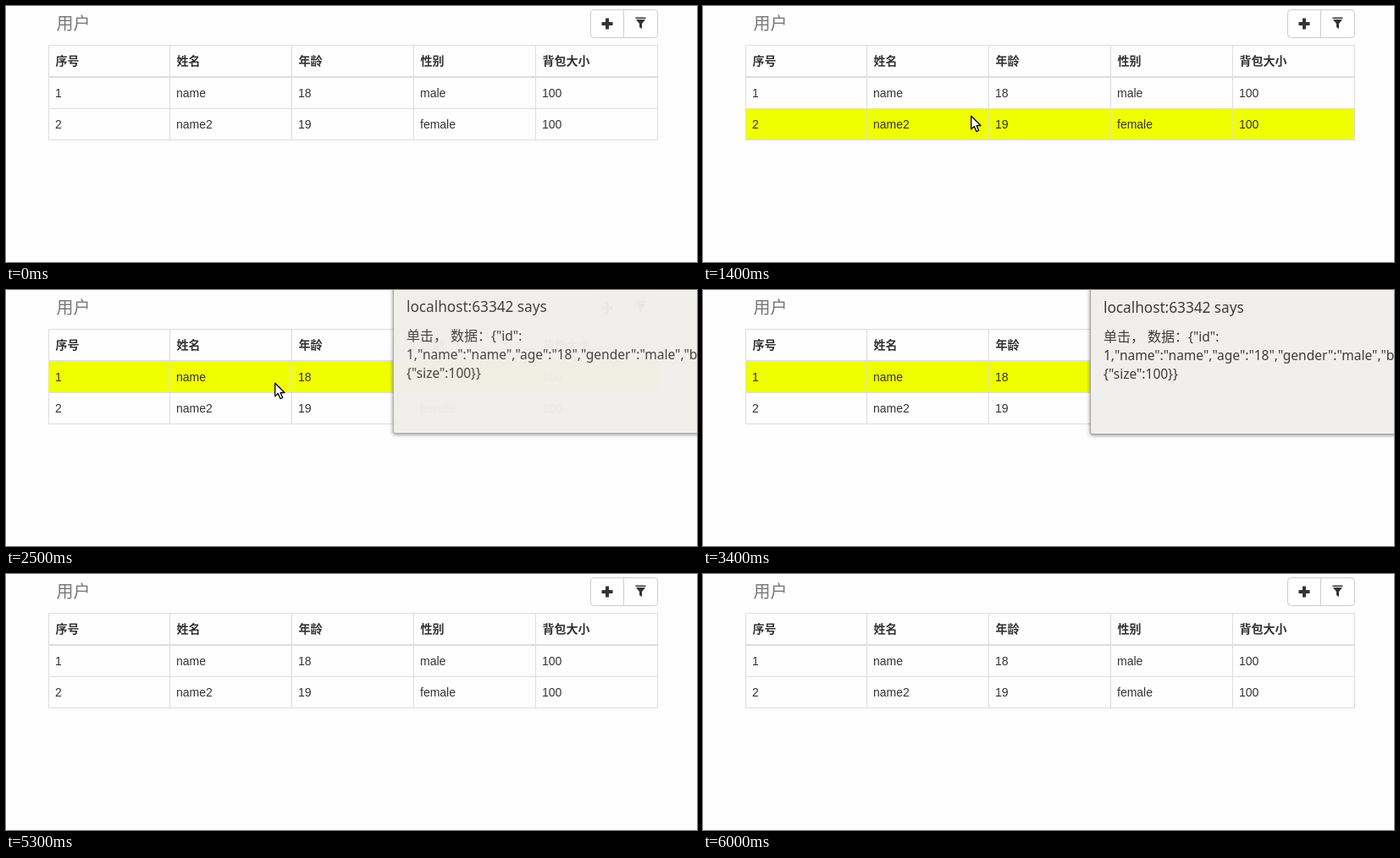
These frames come from a looping animation (816 px wide and 303 px high, 6.4 s). An HTML page:

```html
<!DOCTYPE html>
<html lang="zh-CN">
<head>
<meta charset="utf-8">
<title>用户</title>
<style>
html, body { margin: 0; width: 100%; height: 100%; overflow: hidden; background: #fefefe; }
#stage { position: relative; width: 816px; height: 303px; overflow: hidden; }
svg { position: absolute; left: 0; top: 0; overflow: visible; }
text { white-space: pre; }

.page { font: 14px "Liberation Sans", Arial, "Noto Sans CJK SC", sans-serif; fill: #333; }
.title { font-size: 20px; fill: #777; }
.head { font-weight: bold; }
.grid { fill: none; stroke: #ddd; shape-rendering: crispEdges; }
.btn { fill: #fff; stroke: #ccc; }
.row { fill: #f0ff00; opacity: 0; }

#dialog {
  position: absolute; left: 457px; top: -30px; width: 466px; height: 201px;
  box-sizing: border-box; border: 1px solid #a5a4a1; border-radius: 3px;
  background: #f1efeb; box-shadow: 0 1px 4px rgba(0, 0, 0, .45);
  transform-origin: 50% 30px; opacity: 0;
}
#dialog svg { left: -1px; top: 29px; }
#dialog text { font: 15.5px "Noto Sans", "Noto Sans CJK SC", sans-serif; fill: #3c3c3c; }
#dialog .says { font-size: 17.2px; }
#dialog .han { font: 16px "Noto Sans CJK SC", sans-serif; }
#dialog .mid { font: 16px "Noto Sans CJK JP", sans-serif; }

#row1, #row2, #dialog, #cursor { animation: 6.4s step-end infinite; }
#row1 { animation-name: row1; }
#row2 { animation-name: row2; }
#dialog { animation-name: dialog; }
#cursor { animation-name: cursor; }

@keyframes row1 {
  0%, 14.0625%, 82.8125%, 89.0625%, 100% { opacity: 0; }
  10.9375%, 23.4375%, 85.9375% { opacity: 1; }
}
@keyframes row2 {
  0%, 23.4375%, 100% { opacity: 0; }
  14.0625% { opacity: 1; }
}
@keyframes dialog {
  0%, 70.3125%, 100% { opacity: 0; transform: none; }
  32.8125% { opacity: .13; transform: translateY(-16.3px) perspective(1200px) rotateX(9deg); }
  34.375% { opacity: .8; transform: translateY(-6.5px) perspective(1200px) rotateX(2.5deg); }
  39.0625% { opacity: .97; transform: translateY(-1px) perspective(1200px) rotateX(.4deg); }
  40.625% { opacity: 1; transform: none; }
  68.75% { opacity: .54; transform: translateY(-11.5px) perspective(1200px) rotateX(5deg); }
}
@keyframes cursor {
  0%, 53.125%, 93.75%, 100% { transform: translate(-50px, 0); }
  6.25% { transform: translate(232px, 29px); }
  7.8125% { transform: translate(250px, 50px); }
  9.375% { transform: translate(268px, 72px); }
  10.9375% { transform: translate(285px, 93px); }
  12.5% { transform: translate(298px, 112px); }
  14.0625% { transform: translate(308px, 128px); }
  15.625% { transform: translate(313px, 136px); }
  18.75% { transform: translate(314px, 139px); }
  20.3125% { transform: translate(315px, 142px); }
  21.875% { transform: translate(316px, 129px); }
  23.4375% { transform: translate(317px, 117px); }
  25% { transform: translate(317px, 109px); }
  40.625% { transform: translate(317px, 108px); }
  43.75% { transform: translate(400px, 113px); }
  45.3125% { transform: translate(500px, 121px); }
  46.875% { transform: translate(564px, 128px); }
  50% { transform: translate(690px, 145px); }
  51.5625% { transform: translate(808px, 160px); }
  84.375% { transform: translate(779px, 125px); }
  85.9375% { transform: translate(640px, 111px); }
  87.5% { transform: translate(490px, 93px); }
  89.0625% { transform: translate(360px, 72px); }
  90.625% { transform: translate(250px, 50px); }
  92.1875% { transform: translate(181px, 35px); }
}
</style>
</head>
<body>
<div id="stage">
  <svg class="page" width="816" height="303">
    <text class="title" x="59.5" y="27.5">用户</text>

    <rect class="btn" x="690.5" y="4.5" width="79" height="33" rx="4"/>
    <path class="btn" d="M729.5 5V37"/>
    <path d="M708 14.5h4v4.5h4.5v4h-4.5v4.5h-4v-4.5h-4.500v-4h4.500z"/>
    <path d="M743.500 13.500h12v1.500h-12zM744 16h11l-4 5v6l-3-2v-4z"/>

    <rect id="row1" class="row" x="50" y="85" width="720" height="37"/>
    <rect id="row2" class="row" x="50" y="122" width="720" height="37"/>
    <path class="grid" d="M50 46.500H770M50 121.500H770M50 158.500H770
      M50.500 46V159M193.500 46V159M337.500 46V159M481.500 46V159M625.500 46V159M769.500 46V159"/>
    <path class="grid" stroke-width="2" d="M50 84H770"/>

    <g class="head">
      <text x="58.500" y="70">序号</text>
      <text x="201.500" y="70">姓名</text>
      <text x="345.500" y="70">年龄</text>
      <text x="489.500" y="70">性别</text>
      <text x="633.500" y="70">背包大小</text>
    </g>
    <text x="58" y="108">1</text>
    <text x="201" y="108">name</text>
    <text x="345" y="108">18</text>
    <text x="489" y="108">male</text>
    <text x="633" y="108">100</text>
    <text x="58" y="145">2</text>
    <text x="201" y="145">name2</text>
    <text x="345" y="145">19</text>
    <text x="489" y="145">female</text>
    <text x="633" y="145">100</text>
  </svg>

  <div id="dialog">
    <svg width="466" height="171">
      <text class="says" x="16" y="27">localhost:63342 says</text>
      <text x="16" y="60.500"><tspan class="han">单击，</tspan> <tspan class="han">数据</tspan><tspan class="mid">：</tspan>{"id":</text>
      <text x="16" y="82.500">1,"name":"name","age":"18","gender":"male","bag":</text>
      <text x="16" y="104.500">{"size":100}}</text>
    </svg>
  </div>

  <svg id="cursor" width="13" height="21">
    <path d="M.7 1.200V16.800L4.300 13.500L7 19.700L9.700 18.500L7.100 12.500H12z"
      fill="#fff" stroke="#000" stroke-width="1.300" stroke-linejoin="round"/>
  </svg>
</div>
</body>
</html>
```
